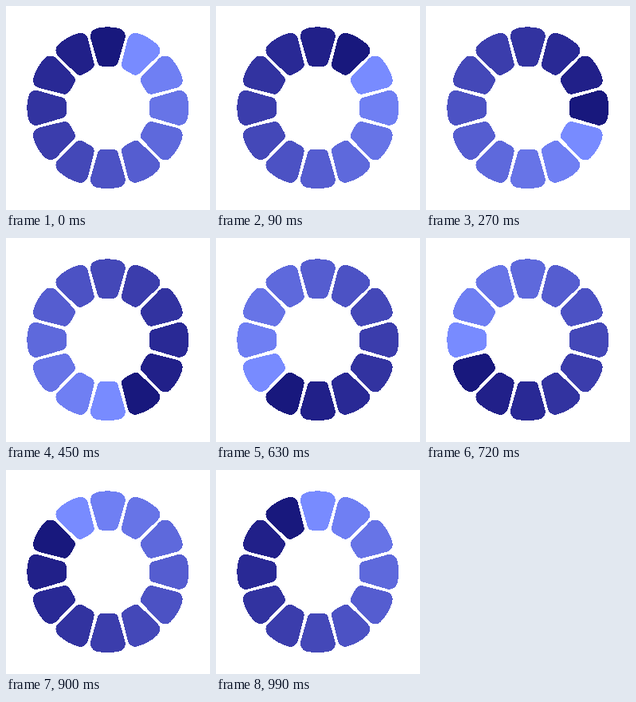
Write an HTML page with a canvas that moves like this. It is 256x256 px and loops after 1.08 s.

```html
<!DOCTYPE html>
<html>
<head>
<meta charset="utf-8">
<title>Spinner</title>
<style>
html, body { margin: 0; width: 100%; height: 100%; overflow: hidden; background: #fff; }
canvas { display: block; width: 256px; height: 256px; }
</style>
</head>
<body>
<canvas id="stage" width="256" height="256"></canvas>
<script>
const SIZE = 256, COUNT = 12, STEP = 90, CENTER = 127.8;
const DARK = [24, 24, 125], LIGHT = [120, 139, 255], CURVE = [1, 1.12, 1];
const ctx = document.getElementById('stage').getContext('2d', { willReadFrequently: true });
const rad = deg => deg * Math.PI / 180;

// Petal pointing up, with the ring centre at the origin
function makePetal() {
  const p = new Path2D();
  const corner = (x, y, r, from, to) => p.arc(x, y, r, rad(from), rad(to));
  p.moveTo(-14.4, -99.7);
  p.quadraticCurveTo(0, -103.3, 14.4, -99.7);
  corner(12, -90, 10, -76, 15);
  corner(6, -59.3, 7.3, 15, 83);
  p.quadraticCurveTo(0, -51.55, -6.9, -52.05);
  corner(-6, -59.3, 7.3, 97, 165);
  corner(-12, -90, 10, 165, 256);
  p.closePath();
  return p;
}

const petal = makePetal();

function shade(k) {
  const mix = DARK.map((c, i) => Math.round(c + (LIGHT[i] - c) * k ** CURVE[i]));
  return `rgb(${mix})`;
}

// Turn soft edges into hard pixel edges
function hardenEdges() {
  const image = ctx.getImageData(0, 0, SIZE, SIZE);
  const px = image.data;
  for (let i = 3; i < px.length; i += 4) px[i] = px[i] < 128 ? 0 : 255;
  ctx.putImageData(image, 0, 0);
}

function draw(head) {
  ctx.setTransform(1, 0, 0, 1, 0, 0);
  ctx.clearRect(0, 0, SIZE, SIZE);
  ctx.translate(CENTER, CENTER);
  for (let i = 0; i < COUNT; i++) {
    const age = (head - i + COUNT) % COUNT;
    ctx.fillStyle = shade(age / (COUNT - 1));
    ctx.fill(petal);
    ctx.rotate(rad(360 / COUNT));
  }
  hardenEdges();
}

const start = performance.now();
let shown = -1;
function tick() {
  const head = Math.floor((performance.now() - start) / STEP) % COUNT;
  if (head !== shown) draw(shown = head);
  requestAnimationFrame(tick);
}
tick();
</script>
</body>
</html>
```
